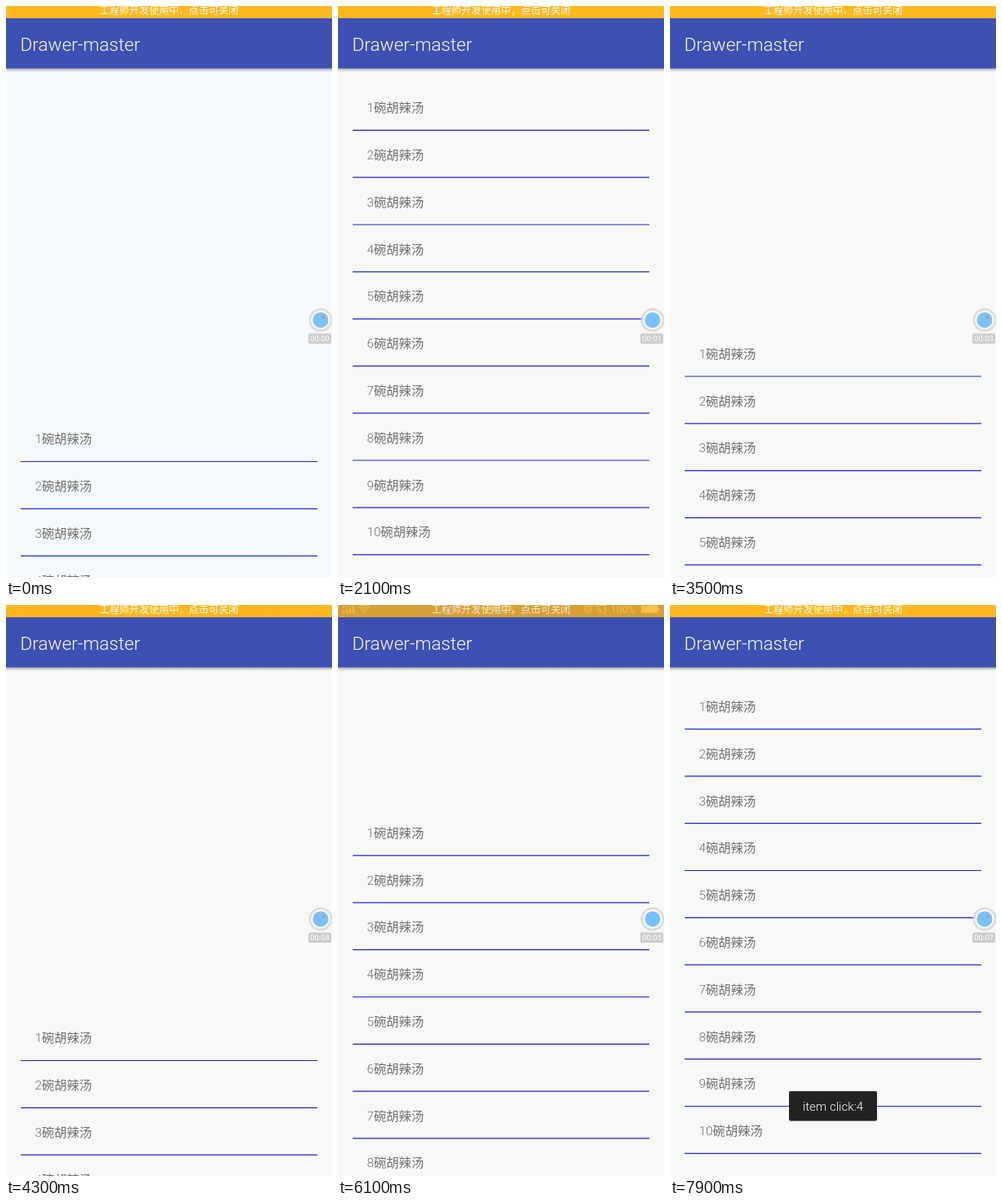
An HTML page with a canvas that plays this animation: 400x700 px, repeating every 8000 ms.

```html
<!DOCTYPE html>
<html lang="zh">
<head>
<meta charset="utf-8">
<style>
html, body { margin: 0; width: 100%; height: 100%; overflow: hidden; background: #f7f9f7; }
canvas { display: block; }
</style>
</head>
<body>
<canvas id="stage" width="400" height="700"></canvas>
<script>
const c = document.getElementById('stage').getContext('2d');
const LOOP = 8000, ROW = 57.8;
const FONT = 'Roboto, "Noto Sans CJK SC", "Noto Sans CJK", sans-serif';

// [time, y of the first divider]
const scrollKeys = [
  [0, 558.5], [500, 558.5], [1100, 452.3], [1400, 300], [1700, 168], [1900, 153.5],
  [2100, 152.4], [2700, 152.1], [3500, 453.7], [3950, 558.5], [4600, 558.5],
  [5200, 494.8], [5700, 420], [6100, 307.5], [6300, 170], [6600, 152.1], [8000, 152.1]
];
// spans during which the ordinary status bar shows
const statusSpans = [[900, 1900], [2600, 3200], [4300, 6050]];

const clamp = v => Math.max(0, Math.min(1, v));

const slope = i => {
  const a = scrollKeys[i], b = scrollKeys[i + 1];
  return a && b ? (b[1] - a[1]) / (b[0] - a[0]) : 0;
};
const tangent = i => {
  const p = slope(i - 1), q = slope(i);
  return p * q > 0 ? 2 * p * q / (p + q) : 0;
};

function scrollAt(t) {
  let i = 0;
  while (i < scrollKeys.length - 2 && t >= scrollKeys[i + 1][0]) i++;
  const [t0, y0] = scrollKeys[i], [t1, y1] = scrollKeys[i + 1];
  const d = t1 - t0, u = (t - t0) / d, v = 1 - u;
  return y0 * (1 + 2 * u) * v * v + y1 * u * u * (3 - 2 * u)
    + d * u * v * (tangent(i) * v - tangent(i + 1) * u);
}

function rect(x, y, w, h, color, r = 0) {
  c.fillStyle = color;
  c.beginPath();
  c.roundRect(x, y, w, h, r);
  c.fill();
}

function disc(x, y, r, color) {
  c.fillStyle = color;
  c.beginPath();
  c.arc(x, y, r, 0, 7);
  c.fill();
}

function arc(x, y, r, from, to) {
  c.beginPath();
  c.arc(x, y, r, from, to);
  c.stroke();
}

function text(s, x, y, size, color, align = 'left', weight = 300) {
  c.font = `${weight} ${size}px ${FONT}`;
  c.textAlign = align;
  c.fillStyle = color;
  c.fillText(s, x, y);
}

function drawList(top) {
  for (let i = 0; i < 10; i++) {
    const y = top + i * ROW;
    text(`${i + 1}碗胡辣汤`, 35.5, y - 22.2, 15.3, '#6e6e6e');
    rect(18, y - 0.6, 364, 1.2, '#1c22d8');
  }
}

function drawStatus(t) {
  const ink = '#d5d9ee';
  rect(0, 0, 400, 15, '#2e3d9c');
  for (let i = 0; i < 4; i++) rect(6 + i * 4, 7 - i * 2, 1.8, 3 + i * 2, ink);
  text('4G', 5, 4, 5, ink);
  c.strokeStyle = ink;
  c.lineWidth = 1.2;
  for (const r of [3, 6, 9]) arc(32.5, 9, r, -2.4, -0.75);
  disc(32.5, 9, 1.1, ink);
  text('17:23', 200, 10, 12.5, ink, 'center', 400);
  arc(307, 5, 4, 0, 7);
  c.beginPath();
  c.moveTo(307, 2.5);
  c.lineTo(307, 5.5);
  c.lineTo(309, 5.5);
  c.moveTo(302, 1.5);
  c.lineTo(304, 0);
  c.moveTo(310, 0);
  c.lineTo(312, 1.5);
  c.moveTo(317, 2);
  c.lineTo(317, 0.5);
  c.lineTo(328, 0.5);
  c.lineTo(328, 9.5);
  c.lineTo(325, 9.5);
  c.stroke();
  for (const r of [3, 6]) arc(317, 9.5, r, -1.57, 0);
  text('100%', 334.5, 9.5, 12.5, ink, 'left', 400);
  rect(372, 0.5, 20, 9, '#eef0fa', 1);
  rect(392, 3, 2, 4, ink);

  const shown = Math.max(...statusSpans.map(([a, b]) =>
    Math.min(clamp((t - a) / 150), clamp((b + 80 - t) / 150))));
  c.globalAlpha = 1 - shown;
  rect(0, 0, 400, 15, '#ffb820');
  text('工程师开发使用中，点击可关闭', 200, 10, 12.2, '#fff', 'center', 400);
  c.globalAlpha = 1;
}

function drawHeader(t) {
  const g = c.createLinearGradient(0, 76, 0, 81);
  g.addColorStop(0, 'rgba(0,0,0,.32)');
  g.addColorStop(1, 'rgba(0,0,0,0)');
  rect(0, 76, 400, 5, g);
  rect(0, 14, 400, 62.5, '#3d50b4');
  text('Drawer-master', 17.5, 55, 22.6, '#fff');
  drawStatus(t);
}

function drawRecorder(t) {
  disc(386, 385, 14.6, 'rgba(214,214,214,.85)');
  disc(386, 385, 11.8, 'rgba(255,255,255,.8)');
  disc(386, 385, 9.5, '#78c2fb');
  const blink = t % 4000;
  if (blink < 1850 || blink > 2500) disc(389.5, 382, 1.8, '#d98a70');
  rect(371, 401.5, 28, 12.5, '#cbcccb', 2);
  const sec = Math.max(0, Math.floor((t - 150) / 1000));
  text(`00:0${sec}`, 385, 411.3, 9.5, '#fff', 'center', 400);
}

function drawToast(t) {
  c.globalAlpha = clamp((t - 7300) / 250);
  rect(146, 596, 108, 36.5, '#212322', 2);
  text('item click:4', 200, 620, 15.1, '#fff', 'center');
  c.globalAlpha = 1;
}

function frame(now) {
  const t = now % LOOP;
  rect(0, 0, 400, 700, t < 500 ? '#f5f9fb' : '#f7f9f7');
  drawList(scrollAt(t));
  drawHeader(t);
  drawRecorder(t);
  drawToast(t);
}

const start = performance.now();
function tick() {
  frame(performance.now() - start);
  requestAnimationFrame(tick);
}
tick();
</script>
</body>
</html>
```
